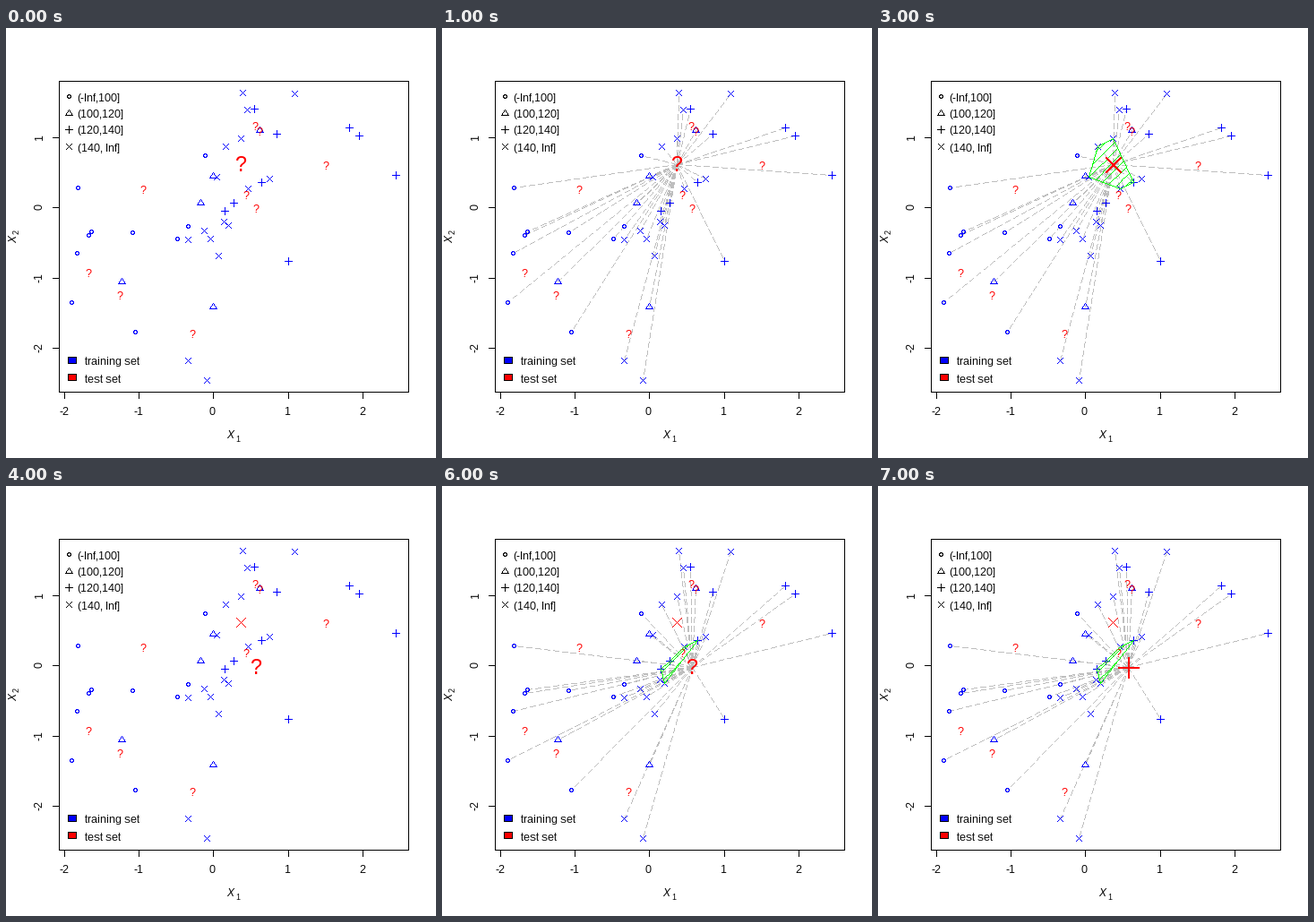
A matplotlib script for the animation above (8000 ms loop, 480 by 480 pixels).

```python
from itertools import product

import numpy as np
import matplotlib.pyplot as plt
from matplotlib.animation import FuncAnimation

plt.rcParams.update({
    "font.family": "Liberation Sans",
    "text.hinting": "native",
    "text.hinting_factor": 1,
})

SIZE, K = 480, 5
BLACK, GRAY = (0, 0, 0, 255), (190, 190, 190, 255)
BLUE, RED, GREEN = (0, 0, 255, 255), (255, 0, 0, 255), (0, 255, 0, 255)
RADIUS = 2.7
LEFT, RIGHT, TOP, BOTTOM = 59, 449, 59, 406
ORIGIN = np.array([231.4, 200.3])
UNIT = np.array([83.2, 78.3])

# Training set by class, in pixels
TRAIN = {
    "circle": [(80, 178), (222, 142), (141, 228), (73, 306), (144, 339),
               (92, 231), (95, 227), (79, 251), (191, 235), (203, 221)],
    "triangle": [(129, 283), (231, 165), (217, 195), (231, 311), (283, 114)],
    "plus": [(277, 90), (302, 118), (383, 111), (394, 120), (435, 164),
             (285, 172), (254, 195), (244, 204), (315, 260)],
    "cross": [(264, 72), (322, 73), (269, 91), (262, 123), (245, 132),
              (235, 166), (270, 179), (294, 168), (243, 216), (248, 220),
              (221, 226), (228, 235), (203, 236), (237, 254), (203, 371),
              (224, 393)],
}
POINTS = np.array([p for group in TRAIN.values() for p in group])
CLASSES = [name for name, group in TRAIN.items() for _ in group]
QUERIES = [(262, 152), (279, 202)]
TESTS = [(278, 110), (283, 116), (357, 154), (153, 181), (268, 187),
         (92, 274), (127, 299), (208, 342)]

fig = plt.figure(figsize=(SIZE / 72, SIZE / 72), dpi=72, facecolor="white")
ax = fig.add_axes([0, 0, 1, 1])
ax.axis("off")


def blank():
    return np.zeros((SIZE, SIZE, 4), np.uint8)


def show(px, z):
    return ax.imshow(px, interpolation="nearest", aspect="auto", zorder=z)


def line(px, p, q, color, lw=1, dash=None):
    """Draw a hard-edged line; dash is (period, drawn part)."""
    p, q = np.asarray(p, float), np.asarray(q, float)
    t = np.linspace(0, 1, int(np.ceil(np.abs(q - p).max())) + 1)
    if dash:
        t = t[t * np.hypot(*(q - p)) % dash[0] < dash[1]]
    x, y = np.rint(p + t[:, None] * (q - p)).astype(int).T
    for dx, dy in product(range(lw), repeat=2):
        px[y + dy, x + dx] = color


def outline(px, pts, color):
    for p, q in zip(pts, np.roll(pts, -1, axis=0)):
        line(px, p, q, color)


def symbol(px, shape, at, color, cex=1, lw=1):
    at, r = np.array(at), RADIUS * cex
    if shape == "circle":
        a = np.linspace(0, 2 * np.pi, 33)[:, None]
        outline(px, at + np.rint(2 * np.hstack([np.cos(a), np.sin(a)])), color)
    elif shape == "triangle":
        corners = r * np.array([[0, -1.555], [1.347, 0.777], [-1.347, 0.777]])
        outline(px, at + np.rint(corners), color)
    else:
        plus = shape == "plus"
        r = round(r * np.sqrt(2)) if plus else round(r)
        for arm in [(r, 0), (0, r)] if plus else [(r, r), (r, -r)]:
            line(px, at - arm, at + arm, color, lw)


def text(x, y, s, size=12, color="black", ha="left", va="baseline", z=4, **kw):
    return ax.text(x - 1, y, s, fontsize=size, color=color, ha=ha, va=va,
                   zorder=z, **kw)


def question(at, size=12):
    return text(at[0], at[1] + 0.36 * size - 1, "?", size, "red", "center")


def draw_axes(px):
    outline(px, [(LEFT, TOP), (RIGHT, TOP), (RIGHT, BOTTOM), (LEFT, BOTTOM)],
            BLACK)
    for v in range(-2, 3):
        x, y = np.rint(ORIGIN + UNIT * (v, -v)).astype(int)
        line(px, (x, BOTTOM), (x, BOTTOM + 7), BLACK)
        text(x, 432, str(v), ha="center")
        if v < 2:
            line(px, (LEFT - 7, y), (LEFT, y), BLACK)
            text(43, y - 1, str(v), ha="right", va="center", rotation=90)
    text(247, 458, "X", style="italic")
    text(257, 461, "1", 8.5)
    side = dict(rotation=90, va="bottom", ha="right")
    text(15, 239, "X", style="italic", **side)
    text(17, 230, "2", 8.5, **side)


def draw_legend(px):
    labels = ["(-Inf,100]", "(100,120]", "(120,140]", "(140, Inf]"]
    for i, (shape, label) in enumerate(zip(TRAIN, labels)):
        y = round(76 + 18.7 * i)
        symbol(px, shape, (70, y), BLACK)
        text(80, y + 5, label)
    for y, color, label in [(371, BLUE, "training set"), (390, RED, "test set")]:
        px[y - 4:y + 4, 69:79] = BLACK
        px[y - 3:y + 3, 70:78] = color
        text(89, y + 5, label)


def nearest(query):
    """Indices of the K nearest training points, in order around them."""
    dist = np.hypot(*((POINTS - query) / UNIT).T)
    near = np.argsort(dist)[:K]
    dx, dy = (POINTS[near] - POINTS[near].mean(axis=0)).T
    return near[np.argsort(np.arctan2(dy, dx))]


def hatch(px, pts, step=7.2 * np.sqrt(2)):
    """Fill a polygon with 45 degree lines x + y = c."""
    sums, base = pts.sum(axis=1), ORIGIN.sum()
    start = base + step * np.ceil((sums.min() - base) / step)
    for c in np.arange(start, sums.max(), step):
        cuts = []
        for p, q in zip(pts, np.roll(pts, -1, axis=0)):
            a, b = p.sum() - c, q.sum() - c
            if a * b < 0:
                cuts.append(p + (q - p) * a / (a - b))
        if len(cuts) == 2:
            line(px, *cuts, GREEN)


def build(query):
    """Artists of each step: question, distances, neighbours, answer."""
    rays, area, answer = blank(), blank(), blank()
    for p in POINTS:
        line(rays, query, p, GRAY, dash=(10, 7))
    near = nearest(query)
    outline(area, POINTS[near], GREEN)
    hatch(area, POINTS[near])
    votes = [CLASSES[i] for i in near]
    winner = max(sorted(set(votes)), key=votes.count)
    symbol(answer, winner, query, RED, 3, 2)

    ask = question(query, 24)
    rays, area, answer = show(rays, 1), show(area, 5), show(answer, 6)
    solved = blank()
    symbol(solved, winner, query, RED, 2)
    steps = [[ask], [ask, rays], [ask, rays, area], [rays, area, answer]]
    return steps, show(solved, 3)


board = blank()
draw_axes(board)
draw_legend(board)
for shape, group in TRAIN.items():
    for point in group:
        symbol(board, shape, point, BLUE)
show(board, 2)
for point in TESTS:
    question(point)

(first, solved), (second, later) = map(build, QUERIES)
later.set_visible(False)
waiting = question(QUERIES[1])
steps = [s + [waiting] for s in first] + [s + [solved] for s in second]
moving = {artist for step in steps for artist in step}
ax.set_xlim(-0.5, SIZE - 0.5)
ax.set_ylim(SIZE - 0.5, -0.5)


def update(i):
    for artist in moving:
        artist.set_visible(artist in steps[i])
    return list(moving)


anim = FuncAnimation(fig, update, frames=len(steps), interval=1000,
                     repeat=True, repeat_delay=0, blit=False)
plt.show()
```
